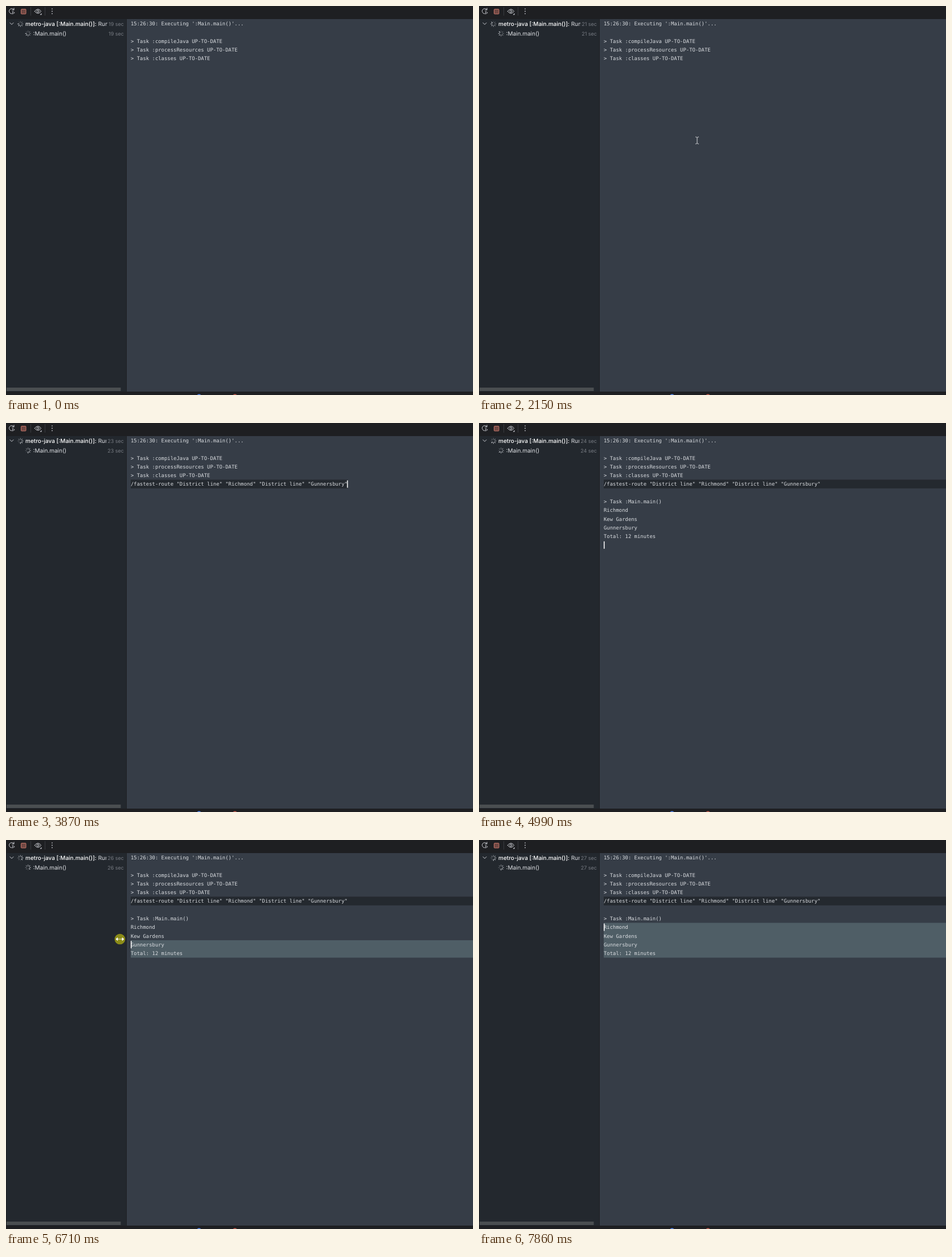
An HTML page that plays this animation: 820x683 px, repeating every 7990 ms.

```html
<!DOCTYPE html>
<html lang="en">
<head>
<meta charset="utf-8">
<title>Run console</title>
<style>
  html, body { margin: 0; width: 100%; height: 100%; overflow: hidden; background: #1e1f22; }
  svg { display: block; width: 820px; height: 683px; }
  text { white-space: pre; text-rendering: geometricPrecision; }
  .ui { font: 10px Inter, sans-serif; fill: #dfe1e5; }
  .ui .time { font-size: 9px; fill: #767a81; text-anchor: end; }
  .mono { font: 8.915px "DejaVu Sans Mono", monospace; fill: #d9dce0; }
  .line { fill: none; stroke: #ced0d6; stroke-linecap: round; stroke-linejoin: round; }
</style>
</head>
<body>
<svg viewBox="0 0 820 683">
  <defs>
    <clipPath id="clip"><rect id="clipBox" x="30" y="24" width="148" height="16"/></clipPath>
    <g id="spin" stroke="#d5d8dd" stroke-width="1.1" stroke-linecap="round"></g>
  </defs>

  <rect width="820" height="683" fill="#1e1f22"/>
  <rect x="1" y="23" width="210" height="654" fill="#23282e"/>
  <rect x="212" y="23" width="608" height="654" fill="#363d47"/>
  <rect x="1" y="670" width="200.500" height="6" fill="#4a4e50"/>
  <circle cx="339" cy="686" r="4.500" fill="#548af7"/>
  <circle cx="402" cy="686" r="4.500" fill="#c75d50"/>

  <!-- toolbar -->
  <g class="line">
    <path d="M13.500 6A4.600 4.600 0 1 0 10 13.700M14 3.800V7h-3.200"/>
    <path d="M11.800 9.700l3.400 2.100-3.400 2.100z" stroke-width=".8"/>
    <rect x="26.500" y="5.500" width="8.500" height="8.500" rx="1" fill="#714843" stroke="#c47568"/>
    <path d="M43.500 2.500v14M68.500 2.500v14" stroke="#393b40"/>
    <path d="M50.300 9.300Q56 1.800 61.700 9.300Q56 16.800 50.300 9.300z"/>
    <circle cx="56" cy="9.300" r="1.900"/>
    <path d="M62.500 12.500v3h-3z" fill="#ced0d6" stroke="none"/>
    <path d="M81 5v.1M81 9.200v.1M81 13.400v.1" stroke-width="1.700"/>
    <path d="M7 29.500l3 3 3-3"/>
  </g>

  <!-- task tree -->
  <g class="ui">
    <use href="#spin" x="25.300" y="31.500"/>
    <use href="#spin" x="38.700" y="48.200"/>
    <g clip-path="url(#clip)">
      <text x="34" y="35"><tspan font-weight="500" fill="#fff">metro-java [:Main.main()]:</tspan> Run</text>
    </g>
    <text x="47.500" y="52">:Main.main()</text>
    <text class="time" x="207" y="35"></text>
    <text class="time" x="207" y="52"></text>
  </g>

  <!-- console -->
  <rect id="band" x="219" fill="#24292f"/>
  <rect id="selection" x="219" width="601" fill="#4f5e66"/>
  <g id="intro" class="mono"></g>
  <g id="command" class="mono" font-style="italic" fill="#eceef0"></g>
  <g id="output" class="mono"></g>
  <rect id="caret" width="1.500" height="13" fill="#fff"/>

  <g id="pointer">
    <circle id="press" r="9.300" fill="#8b8b18"/>
    <path id="beam" fill="none" stroke="#d4d6d9" d="M-3-6h1.500L0-4.800 1.500-6H3M0-5V5M-3 6h1.500L0 4.800 1.500 6H3"/>
    <path id="resize" fill="#fff" stroke="#fff" stroke-width=".8" d="M-7 0l3-2.500v5zM7 0l-3-2.500v5zM-4 0H4"/>
  </g>
</svg>
<script>
const $ = id => document.getElementById(id);
const NS = 'http://www.w3.org/2000/svg';
const LOOP = 7990, PASTE = 2540, ENTER = 4200, PRESS = 6150, RELEASE = 7500;
const TOP = 23, ROW = 15.3, LEFT = 219, END = 600;
const rowTop = r => TOP + r * ROW;

function add(parent, tag, attrs) {
  const el = document.createElementNS(NS, tag);
  for (const k in attrs) el.setAttribute(k, attrs[k]);
  return parent.appendChild(el);
}
function set(id, attrs) {
  for (const k in attrs) $(id).setAttribute(k, attrs[k]);
}
function show(id, on) {
  $(id).style.display = on ? '' : 'none';
}
function print(id, row, lines) {
  lines.forEach((line, i) => {
    if (line) add($(id), 'text', { x: LEFT, y: rowTop(row + i) + 10.9 }).textContent = line;
  });
}

print('intro', 0, [
  "15:26:30: Executing ':Main.main()'...", '',
  '> Task :compileJava UP-TO-DATE',
  '> Task :processResources UP-TO-DATE',
  '> Task :classes UP-TO-DATE'
]);
print('command', 5, ['/fastest-route "District line" "Richmond" "District line" "Gunnersbury"']);
print('output', 7, ['> Task :Main.main()', 'Richmond', 'Kew Gardens', 'Gunnersbury', 'Total: 12 minutes']);

const spokes = Array.from({ length: 8 }, (_, i) =>
  add($('spin'), 'path', { d: 'M0-2.6V-4.6', transform: `rotate(${i * 45})` }));
const times = document.querySelectorAll('.time');

// Pointer trips as [time, x, y]; it is hidden outside them.
const trips = [
  [[650, 340, 603], [1000, 363, 348], [1350, 387, 250], [1760, 383, 236],
   [2280, 383, 236], [2500, 789, 170], [PASTE, 789, 170]],
  [[5100, 645, 215], [5590, 374, 246], [5760, 340, 261], [6010, 291, 252],
   [PRESS, 270, 257], [6500, 206, 200], [6710, 200, 174], [6790, 200, 179],
   [7100, 198, 150], [RELEASE, 198, 150]]
];
function pointerAt(t) {
  for (const trip of trips) {
    const i = trip.findIndex(p => p[0] > t);
    if (i < 1) continue;
    const [t0, x0, y0] = trip[i - 1], [t1, x1, y1] = trip[i];
    const k = (t - t0) / (t1 - t0);
    return { x: x0 + (x1 - x0) * k, y: y0 + (y1 - y0) * k };
  }
  return null;
}

function draw(t) {
  const step = Math.floor(t / 125);
  spokes.forEach((s, i) => {
    const age = (step + 6 - i + 16) % 8;
    s.setAttribute('opacity', 1 - age * 0.115);
  });

  const label = 19 + Math.floor((t + 600) / 1000) + ' sec';
  times.forEach(el => { el.textContent = label; });
  set('clipBox', { width: 175 - times[0].getComputedTextLength() });

  const pasted = t >= PASTE, entered = t >= ENTER;
  show('command', pasted);
  show('band', pasted);
  set('band', { y: rowTop(5), height: ROW, width: (entered ? 820 : END) - LEFT });
  show('output', entered);

  const p = pointerAt(t);
  const dragging = t >= PRESS && t < RELEASE;
  show('pointer', p);
  if (p) {
    const onSplitter = p.x < 212;
    set('pointer', { transform: `translate(${p.x} ${p.y})` });
    show('press', dragging);
    show('beam', !onSplitter);
    show('resize', onSplitter);
  }

  let row = entered ? 12 : 5;
  if (t >= RELEASE) row = 8;
  else if (dragging) row = Math.min(12, Math.round((p.y - TOP) / ROW));
  show('selection', entered && row < 12);
  set('selection', { y: rowTop(row), height: (12 - row) * ROW });

  show('caret', pasted && t % 1000 >= 500);
  set('caret', { x: entered ? LEFT : END - 1.2, y: rowTop(row) + 1.2 });
}

const start = performance.now();
function tick() {
  draw((performance.now() - start) % LOOP);
  requestAnimationFrame(tick);
}
tick();
</script>
</body>
</html>
```
